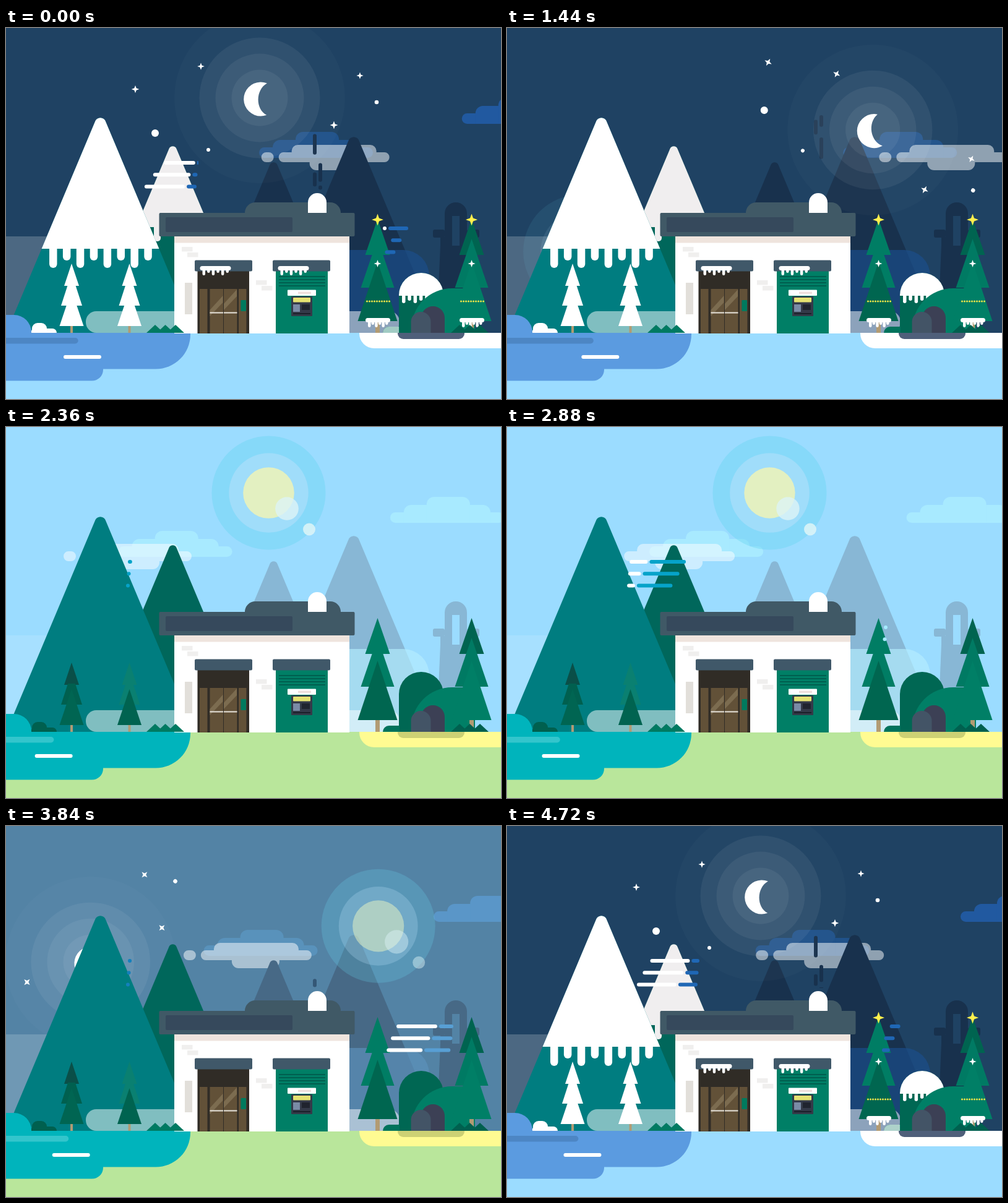
Write an HTML page with a canvas that moves like this. It is 800x600 px and loops after 4.76 s.

```html
<!DOCTYPE html>
<html lang="en">
<head>
<meta charset="utf-8">
<title>Day and night</title>
<style>
html, body { margin: 0; width: 100%; height: 100%; overflow: hidden; }
canvas { display: block; }
</style>
</head>
<body>
<canvas id="stage" width="800" height="600"></canvas>
<script>
const g = document.getElementById('stage').getContext('2d');
const LOOP = 4760, DAY_START = 1640;
const RAD = Math.PI / 180;
const WHITE = '#ffffff';

const ramp = (t, a, b) => Math.min(1, Math.max(0, (t - a) / (b - a)));
const smooth = (t, a, b) => { const x = ramp(t, a, b); return x * x * (3 - 2 * x); };
// Springy scale from 0 to 1 with overshoot
const pop = t => t < 0 ? 0 : 1 - Math.exp(-t / 190) * Math.cos(t * Math.PI / 150);

const rgb = hex => [1, 3, 5].map(i => parseInt(hex.slice(i, i + 2), 16));
const mix = (day, night, k) => {
  const a = rgb(day), b = rgb(night);
  return `rgb(${a.map((v, i) => Math.round(v + (b[i] - v) * k))})`;
};

function repeat(n, paint) {
  for (let i = 0; i < n; i++) paint(i);
}
function box(x, y, w, h, r, fill) {
  if (w <= 0 || h <= 0) return;
  g.fillStyle = fill;
  g.beginPath();
  g.roundRect(x, y, w, h, r);
  g.fill();
}
const dome = (x, y, w, h, r, fill) => box(x, y, w, h, [r, r, 0, 0], fill);
function disc(x, y, r, fill) {
  g.fillStyle = fill;
  g.beginPath();
  g.arc(x, y, r, 0, 7);
  g.fill();
}
function poly(fill, ...p) {
  g.fillStyle = fill;
  g.beginPath();
  for (let i = 0; i < p.length; i += 2) g.lineTo(p[i], p[i + 1]);
  g.fill();
}
function faded(alpha, paint) {
  if (alpha <= 0) return;
  g.save();
  g.globalAlpha *= alpha;
  paint();
  g.restore();
}
// Rounded mountain, optionally cut off at a lower edge
function peak(x, apex, r, fill, bottom = 493) {
  const half = (bottom - apex) * 0.42;
  g.fillStyle = fill;
  g.beginPath();
  g.moveTo(x - half, bottom);
  g.arcTo(x, apex, x + half, bottom, r);
  g.lineTo(x + half, bottom);
  g.fill();
}
// Symmetric slice of a fir tree
function tier(x, top, topHalf, bottom, half, fill) {
  poly(fill, x - topHalf, top, x + topHalf, top, x + half, bottom, x - half, bottom);
}
function sparkle(x, y, r, fill) {
  g.fillStyle = fill;
  g.beginPath();
  repeat(8, i => {
    const d = i % 2 ? r * 0.37 : r, a = i * 45 * RAD;
    g.lineTo(x + d * Math.cos(a), y + d * Math.sin(a));
  });
  g.fill();
}
// Row of hanging drops, long and short in turn
function drips(n, x, step, y, w, length, vary) {
  repeat(n, i => box(x + i * step, y - w, w, w + length + (i % 2 ? -vary : vary), w / 2, WHITE));
}
function icicles(x, y, w) {
  box(x, y, w, 7, 3.5, WHITE);
  drips(6, x + 4, (w - 12) / 5, y + 6, 4.5, 7, 2);
}

// Sky

function stepCloud(x, y, fill) {
  box(x, y + 25, 184, 17, 8.5, fill);
  dome(x + 22, y + 13, 140, 29, 12, fill);
  dome(x + 59, y, 70, 40, 12, fill);
}

function clouds(e, k) {
  const alpha = e < 4000 ? ramp(e, 1950, 2350) : 1 - ramp(e, 6320, 6440);
  const since = e - 2880, x = 189 + 0.131 * since;
  faded(alpha, () => {
    stepCloud(645.5 + 0.0475 * since, 113, mix('#a8eaff', '#2159a0', k));
    stepCloud(230 + 0.0932 * since, 168, mix('#a8eaff', '#20528a', k));
    g.fillStyle = 'rgba(255,255,255,.5)';
    g.beginPath();
    g.roundRect(x - 28, 201, 20, 16, 8);
    g.roundRect(x, 201, 179, 16, 8);
    g.roundRect(x + 21, 189, 137, 21, 10);
    g.roundRect(x + 50, 205, 77, 25, 11);
    g.fill();
  });
}

function smoke(e, k) {
  const now = e < 2600 ? e + 4800 : e;
  const puff = (x, start) => {
    const s = (now - start) / 1000;
    if (s < 0 || s > 1.8) return;
    const top = 262 - 79 * s, bottom = 262 - 43.5 * s * s;
    box(x - 3, top, 6, bottom - top, 3, mix('#5a8aae', '#18314d', k));
  };
  repeat(3, i => {
    puff(499, 3654 + 786 * i ** 0.55);   // gaps get shorter
    puff(508, 4250 + 458 * i);
  });
}

function sun(t, k) {
  if (t < 1420 || t > 3960) return;
  const angle = -90 * (1 - ramp(t, 1420, 1940)) ** 3 + 100 * ramp(t, 3560, 3960) ** 3;
  const pulse = Math.cos((t - 1840) / 260) * 0.5;
  const x = 424.5 + 311.5 * Math.sin(angle * RAD), y = 418 - 311.5 * Math.cos(angle * RAD);
  faded(1 - 0.8 * k, () => {
    disc(x, y, 92, 'rgba(105,213,240,.42)');
    disc(x, y, 64 - pulse, 'rgba(190,225,250,.45)');
    disc(x, y, 41.5 + pulse, '#e3f0c1');
    disc(x + 29.5, y + 25.5, 19 + pulse, 'rgba(222,244,247,.8)');
    disc(x + 65.5, y + 59, 10, 'rgba(222,244,247,.85)');
  });
}

function moon(e) {
  if (e < 3720 || e > 6430) return;
  const angle = -90 * (1 - ramp(e, 3720, 4320)) ** 3 + 90 * ramp(e, 5895, 6400) ** 3;
  const pulse = 1.5 * Math.sin((e - 4480) / 190);
  g.save();
  g.translate(400, 490);
  g.rotate(angle * RAD);
  g.translate(-400, -490);
  disc(410, 113, 138, 'rgba(255,255,255,.02)');
  repeat(3, i => disc(410, 113, 96 - 26 * i + pulse, 'rgba(255,255,255,.057)'));
  for (const [x, y] of [[209, 99], [315, 62], [572, 77], [530, 157]])
    sparkle(x, y, 6 + 0.5 * Math.sin(e / 200 + x), WHITE);
  for (const [x, y, r] of [[241, 170, 6], [327, 197, 3], [599, 120, 3.3]]) disc(x, y, r, WHITE);
  g.translate(410, 113);
  g.rotate(-1.33 * angle * RAD);
  g.fillStyle = WHITE;
  g.beginPath();
  g.arc(1.7, 2, 27.5, -1.2, 1.22, true);
  g.bezierCurveTo(-7, 18, -7, -13, 11.7, -23.6);
  g.fill();
  g.restore();
}

// Wind streaks: a coloured lead, then a white stroke whose tail catches up late
function wind(e, x, y, zeros, colour) {
  const length = 114;
  for (const zero of zeros) repeat(3, i => {
    const t = e - zero - i * 50;
    if (t < -500 || t > 770) return;
    const lead = 6 + (length - 6) * smooth(t, -320, 470);
    const tail = length * ramp(t, 0, 770) ** 4;
    const head = Math.min(length, Math.max(tail + 6, length * smooth(t, -20, 750)));
    const from = t < -60 ? Math.max(0, lead - 17) : head + 3;
    const left = x - i * 1.5, top = y + i * 19.3 - 3;
    box(left + from, top, lead - from, 6, 3, colour);
    if (t > -60) box(left + tail, top, head - tail, 6, 3, WHITE);
  });
}

// Landscape

function backdrop(k) {
  const shade = mix('#88b7d5', '#18314d', k);
  peak(432.5, 207, 6.5, shade);
  peak(562, 162, 9, shade);
  g.fillStyle = shade;
  g.beginPath();
  g.roundRect(709, 282, 36, 70, [18, 18, 0, 0]);
  g.rect(721, 304, 12, 48);
  g.fill('evenodd');
  box(690, 326, 19, 13, 3, shade);
  box(745, 326, 20, 13, 3, shade);
  tier(706, 338, 4, 352, 4, shade);
  tier(748, 338, 4, 352, 4, shade);
  tier(727, 352, 25, 493, 31, shade);
}

function frontMountains(k) {
  peak(269.5, 181, 6.5, '#00675b');
  faded(k, () => {
    peak(269.5, 181, 6.5, '#f0eeef', 322);
    box(239, 310, 11, 35, 5, '#f0eeef');
  });
  peak(152.5, 131, 9, '#007d80');
  faded(k, () => {
    peak(152.5, 131, 9, WHITE, 357);
    drips(8, 70, 21.9, 357, 12.5, 25, 6);
  });
}

function smallTree(x, colours, k) {
  const [a, b, c] = colours.map(day => mix(day, WHITE, k));
  box(x - 2, 480, 4, 13, 0, '#b29b73');
  tier(x, 381, 0, 417, 12, a);
  tier(x, 415, 6, 449, 17, b);
  tier(x, 424, 0, 482, 19.5, c);
}

function bigTree(x, colours, scale, k) {
  const [a, b, c] = colours;
  box(x - 3.5, 472, 7, 21, 0, '#b29b73');
  tier(x, 309, 0, 367, 20, a);
  tier(x, 341, 0, 420, 27, b);
  tier(x, 378, 0, 474, 32, c);
  faded(k, () => {
    sparkle(x, 310, 9.5 * scale, '#fff04d');
    sparkle(x, 381, 6 * scale, WHITE);
    repeat(10, i => disc(x - 17 + i * 4, 442, 1.5, '#f1e548'));
    icicles(x - 19.5, 469, 40);
  });
}

function zigzag(x, fill) {
  repeat(3, i => tier(x + 14 + i * 16.5, 480, 0, 493, 14, fill));
}

function house(k) {
  const slate = '#405966';
  dome(386, 282, 155, 20, 17, slate);
  dome(488, 267, 30, 33, 15, WHITE);
  box(272, 337, 283, 157, 0, WHITE);
  box(272, 337, 283, 10.5, 0, '#efe4dd');
  box(247.5, 299, 316, 38, 2, slate);
  box(258, 306, 205, 24, 2, '#36495c');
  repeat(4, i => {
    const pair = i >> 1, step = i % 2 * 9;
    box(284 + pair * 120 + step, 354 + pair * 54 + step, 17.5, 7.5, 0, '#f0efee');
  });
  box(289, 412, 12, 51, 0, '#e2dfda');

  // Door
  box(309.5, 393, 83.5, 101, 0, '#302c26');
  repeat(2, i => {
    const x = 329.5 + i * 22.5, y = 454 - i * 10;
    box(313 + i * 63, 422, 12.5, 72, 0, '#625138');
    box(x, 422, 21.5, 72, 0, '#625138');
    poly('#7c6c50', x + 21, y - 21, x + 21, y - 10, x, y + 12, x, y + 2);
    box(x, 459.5, 21.5, 2, 0, '#e8e4dc');
  });
  box(379.5, 440, 8.5, 18, 1, '#007a5e');

  // Cash machine
  box(436, 393, 84, 101, 0, '#007f66');
  repeat(4, i => box(441, 401 + i * 5, 75, 2, 0, '#005f4f'));
  box(455, 423.5, 46, 9.5, 1, WHITE);
  box(472, 426.5, 21, 3.5, 0, '#f0e0dd');
  box(461, 434, 34, 32, 1, '#343a49');
  box(464, 436, 28, 7.5, 1, '#e5e272');
  box(464, 447, 11, 12, 0, '#7a8ba6');
  box(478, 447, 13, 9, 0, '#20242f');
  box(464, 461, 28, 2, 0, '#1b202a');

  for (const x of [305, 431]) {
    box(x, 375.5, 93, 18, 2, '#405869');
    faded(k, () => icicles(x + 8.5, 385, 50));
  }
}

function cave(e, k) {
  dome(635, 396, 72, 97, 36, '#006753');
  faded(k, () => {
    dome(635, 396, 72, 37, 36, WHITE);
    drips(6, 640, 9.3, 433, 5.5, 10, 2);
  });
  box(655, 421, 103, 72, [66, 20, 0, 0], '#007f66');
  box(609, 483, 27, 10, [10, 0, 0, 0], '#00735c');
  faded(k * (1 - ramp(e, 4160, 5900)), () => box(609, 483, 26, 10, [10, 0, 0, 0], WHITE));
  dome(671, 450, 38, 43, 19, '#3c4055');
  dome(654.5, 459, 32, 34, 16, '#435466');
}

function water(e, k) {
  const lake = mix('#00b4bc', '#5b9be0', k), since = e - 1840;
  box(0, 464, 41, 40, [0, 28, 0, 0], lake);
  box(0, 493, 298, 58.5, [0, 0, 56, 0], lake);
  box(0, 540, 157, 30.5, [0, 0, 18, 0], lake);
  box(-10, 501, 79 + 0.0161 * since, 9.5, 4.7, mix('#33c5cc', '#4d86c4', k));
  box(36.7 + 0.019 * since, 529, 61, 6, 3, WHITE);
}

function draw(t) {
  const e = t < DAY_START ? t + 4800 : t;   // continuous time since daybreak
  const skyK = 1 - ramp(t, 1720, 1820) + ramp(t, 3760, 3900);
  const k = 1 - ramp(t, 1600, 1760) + ramp(t, 3860, 4000);
  const night = e < 3900 ? 5000 : e;

  box(0, 0, 800, 600, 0, mix('#9bdcff', '#1f4263', skyK));
  box(0, 337, 260, 156, 0, `rgba(255,255,255,${0.12 + 0.08 * skyK})`);
  clouds(e, skyK);
  backdrop(skyK);
  faded(0.65, () => box(540, 359, 144, 134, [0, 42, 0, 0], mix('#b5eeff', '#1b4f8e', skyK)));
  smoke(e, skyK);
  sun(t, skyK);
  moon(e);
  frontMountains(k);
  wind(e, 197, 218, [2640, 4150], mix('#06a3c9', '#1f67b5', skyK));
  box(129, 458, 507, 35, 17, 'rgba(255,255,255,.5)');

  box(0, 493, 800, 107, 0, mix('#b9e69b', '#9bdcff', k));
  smallTree(106, ['#0a4f48', '#00604f', '#006552'], k);
  smallTree(199.5, ['#0a8071', '#0a8071', '#006350'], k);
  const bush = mix('#00604f', WHITE, k);
  dome(40, 486, 42, 7.5, 7, bush);
  dome(42, 477, 24, 16, 9, bush);
  water(e, k);
  house(k);
  zigzag(227, '#007a62');

  box(571, 493, 240, 25, [0, 0, 0, 24], mix('#fffb92', WHITE, k));
  cave(e, k);
  bigTree(600.5, ['#007d64', '#007d64', '#006650'], pop(night - 3920), k);
  bigTree(752.5, ['#006450', '#007a63', '#007f66'], pop(night - 4010), k);
  zigzag(719, '#00604f');
  box(633, 493, 108, 10, [0, 0, 9, 9], mix('#cdd174', '#4f5f7a', k));
  wind(e, 609, 324, [3330, 4820], mix('#a6ebff', '#1f67b5', skyK));
}

function tick() {
  draw(performance.now() % LOOP);
  requestAnimationFrame(tick);
}
tick();
</script>
</body>
</html>
```
